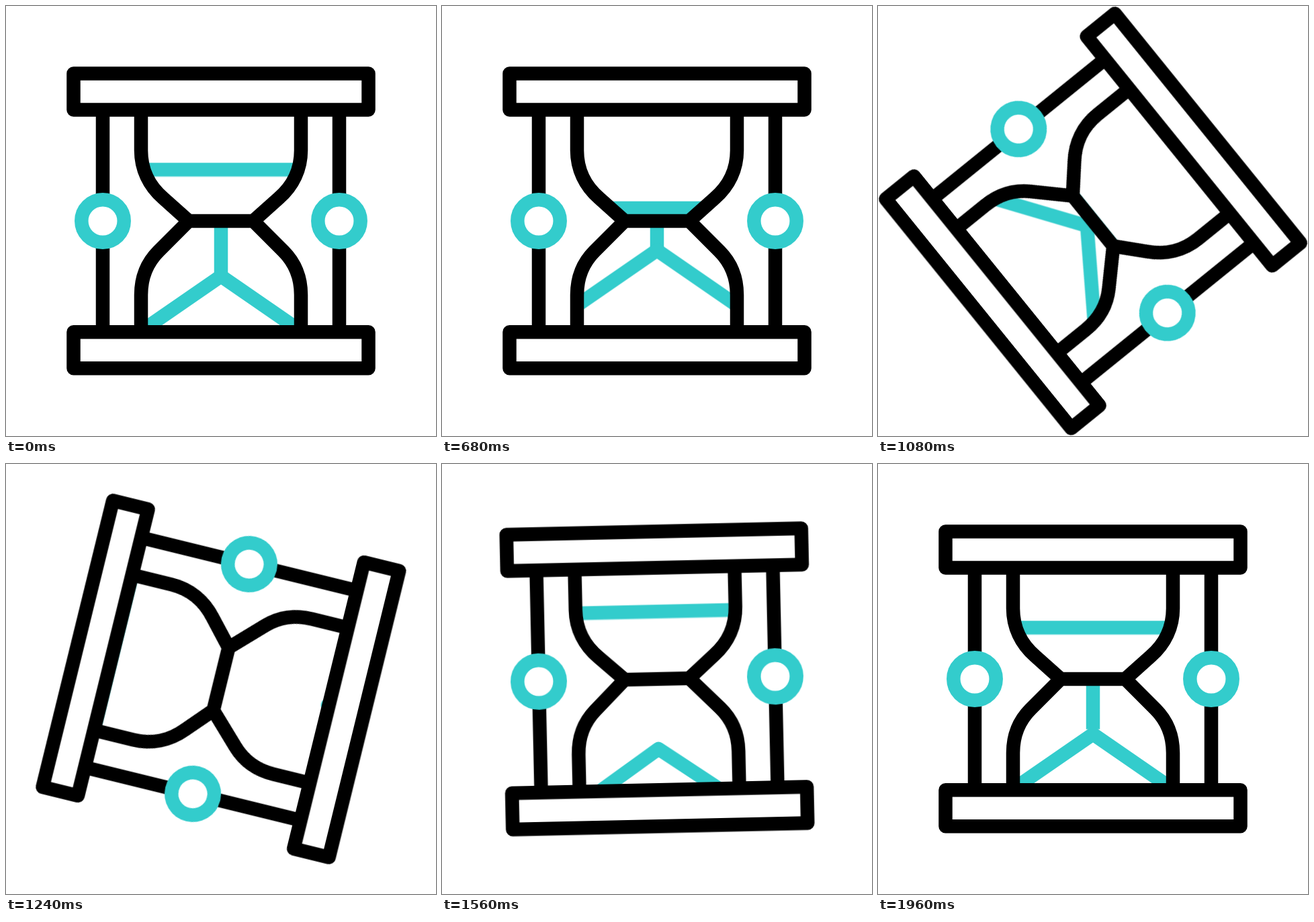
An HTML page that plays this animation: 640 by 640 pixels, repeating every 2 s.

```html
<!DOCTYPE html>
<html lang="en">
<head>
<meta charset="utf-8">
<title>Hourglass</title>
<style>
  html, body { margin: 0; width: 100%; height: 100%; overflow: hidden; background: #fff; }
  svg { display: block; width: 100vw; height: 100vh; }

  .frame, .sand, .beads { fill: none; stroke-width: 20.5; }
  .frame { stroke: #000; }
  .sand { stroke: #33cccc; }
  .beads { stroke: #33cccc; fill: #fff; }

  .spin, .flip, .level, .pile, .stream { animation: 2s linear infinite; }
  .spin, .flip { transform-origin: 320px 320px; }
  .spin { animation-name: spin; }
  .flip { animation-name: flip; }
  .level { animation-name: level; }
  .pile { animation-name: pile; }
  .stream { animation-name: stream; }

  @keyframes spin {
    0% { transform: rotate(0deg); }
    40% { transform: rotate(0deg); animation-timing-function: cubic-bezier(.3333, 0, .6667, 1); }
    80%, 100% { transform: rotate(180deg); }
  }
  /* Halfway through the turn the two chambers trade places. */
  @keyframes flip {
    0%, 59.99% { transform: rotate(0deg); }
    60%, 100% { transform: rotate(180deg); }
  }
  @keyframes level {
    0%, 10% { transform: translateY(243.5px); }
    42.1%, 59.99% { transform: translateY(320px); }
    60% { transform: translateY(153px); animation-timing-function: cubic-bezier(.3333, 0, .6667, 1); }
    87.25%, 100% { transform: translateY(243.5px); }
  }
  @keyframes pile {
    0%, 10% { transform: translateY(402px); }
    59.99% { transform: translateY(322px); }
    60% { transform: translateY(485px); animation-timing-function: cubic-bezier(.3333, 0, .6667, 1); }
    87.25%, 100% { transform: translateY(402px); }
  }
  @keyframes stream {
    0%, 10% { transform: translateY(402px); }
    59.99% { transform: translateY(322px); }
    60%, 78% { transform: translateY(320px); }
    100% { transform: translateY(402px); }
  }
</style>
</head>
<body>
<svg viewBox="0 0 640 640">
  <defs>
    <path id="upper" d="M201 155V215C201 243 213 268 234 286L272 320H368L406 286C427 268 439 243 439 215V155"/>
    <path id="lower" d="M201 485V430C201 405 210 382 227 365L272 320H368L413 365C430 382 439 405 439 430V485"/>
    <path id="outline" d="M201 155V215C201 243 213 268 234 286L272 320L227 365C210 382 201 405 201 430V485
      M439 155V215C439 243 427 268 406 286L368 320L413 365C430 382 439 405 439 430V485M272 320H368"/>
    <clipPath id="top"><use href="#upper"/></clipPath>
    <clipPath id="bottom"><use href="#lower"/></clipPath>
  </defs>

  <g class="spin"><g class="flip">
    <g class="sand">
      <g clip-path="url(#top)"><path class="level" d="M190 0H450"/></g>
      <g clip-path="url(#bottom)">
        <path class="stream" d="M320 -200V0"/>
        <path class="pile" d="M120 138L320 0L520 138" stroke-linejoin="round"/>
      </g>
    </g>
    <g class="frame">
      <path d="M144 155V485M496 155V485"/>
      <use href="#outline"/>
      <g stroke-linejoin="round">
        <rect x="100.5" y="100.6" width="439" height="54"/>
        <rect x="100.5" y="485.3" width="439" height="54"/>
      </g>
    </g>
    <g class="beads">
      <circle cx="144" cy="320" r="31.7"/>
      <circle cx="496" cy="320" r="31.7"/>
    </g>
  </g></g>
</svg>
</body>
</html>
```
